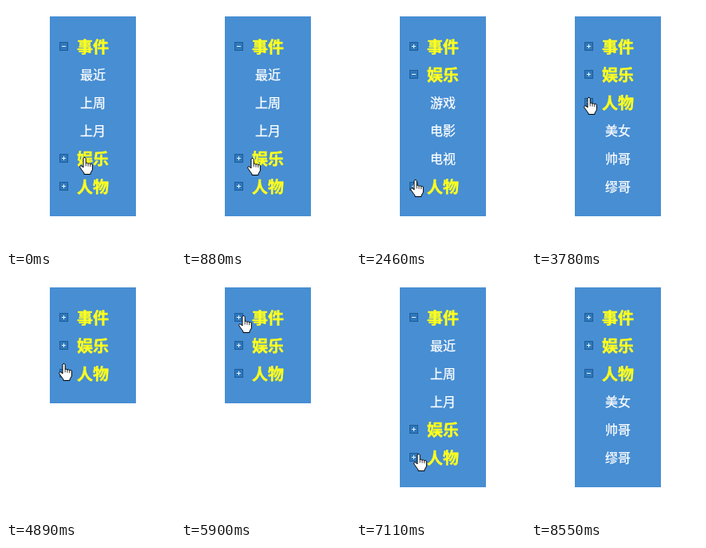
These frames come from a looping animation (212x304 px, 8.93 s). An HTML page:

```html
<!DOCTYPE html>
<html lang="zh-CN">
<head>
<meta charset="utf-8">
<title>菜单</title>
<style>
html, body { margin: 0; width: 100%; height: 100%; overflow: hidden; background: #fff; }
svg { display: block; font-family: "Noto Sans CJK SC", "Noto Sans CJK", sans-serif; }
.title { font-size: 20px; font-weight: 700; fill: #ffff1e; stroke: #ffff1e; stroke-width: .4px; }
.item { font-size: 16px; fill: #fff; stroke: #fff; stroke-width: .25px; }
</style>
</head>
<body>
<svg width="212" height="304" viewBox="0 0 212 304">
  <rect id="panel" x="55" y="13" width="108" fill="#478ed3"/>
  <g id="menu"></g>
  <g id="hand" stroke="#000" stroke-linejoin="round" stroke-linecap="round">
    <path fill="#fff" d="M6.6.5C5.4.5 5 1.3 5 2.1V13L3 11.2C1.6 10.2 0 11.4.8 12.9L4.4 18 6 20V21.5H14V20L16.4 16V10C16.4 8.3 14.3 7.9 13.8 9.2 13.5 7.6 11.4 7.3 11 8.5 10.6 7 8.6 6.8 8.2 7.8V2.1C8.2 1.3 7.8.5 6.6.5Z"/>
    <path fill="none" stroke-width=".8" d="M8.2 8V11M11 8.6V11.4M13.8 9.4V11.8"/>
  </g>
</svg>
<script>
const LOOP = 8930, STEP = 65, TOP = 33, ROW = 35;
const groups = [
  ['事件', '最近', '上周', '上月'],
  ['娱乐', '游戏', '电影', '电视'],
  ['人物', '美女', '帅哥', '缪哥']
];
const home = [92, 189];
// start, end, x, y, sideways bow
const moves = [
  [130, 210, 73, 198],
  [390, 1140, 69, 186, 14],
  [1890, 2280, 61, 217],
  [2430, 2460, 68, 217],
  [3130, 3780, 66, 114, 6],
  [4820, 5270, 68, 82],
  [5470, 5720, 72, 48],
  [6260, 7110, 72, 221, 7],
  [7180, 7300, 66, 226],
  [8180, 8550, 194, 304]
];
const clicks = [1510, 2820, 4210, 6080, 7750];

const byId = id => document.getElementById(id);
const panel = byId('panel'), menu = byId('menu'), hand = byId('hand');

const ease = p => .5 * p + .5 * p * p * (3 - 2 * p);
const mix = (a, b, p) => a + (b - a) * p;

// The pointer advances in even ticks, one roughly every STEP ms.
function handAt(t) {
  let [x, y] = home;
  for (const [t0, t1, x1, y1, bow = 0] of moves) {
    if (t < t0) break;
    const n = Math.round((t1 - t0) / STEP) + 1;
    const done = Math.min(1, (t - t0) / (t1 - t0));
    const p = ease((Math.floor(done * (n - 1) + 1e-6) + 1) / n);
    x = Math.round(mix(x, x1, p) + bow * Math.sin(Math.PI * p));
    y = Math.round(mix(y, y1, p));
  }
  return [x, y];
}

// Visible rows, top to bottom
const rowsFor = open => groups.flatMap(([title, ...items], group) => [
  { text: title, group },
  ...(group === open ? items.map(text => ({ text })) : [])
]);

// Each click toggles the group under the pointer.
function openAt(t) {
  let open = 0;
  for (const at of clicks.filter(c => c <= t)) {
    const { group } = rowsFor(open)[Math.floor((handAt(at)[1] - TOP) / ROW)];
    open = group === open ? -1 : group;
  }
  return open;
}

const label = (cls, x, y, s) => `<text class="${cls}" x="${x}" y="${y}">${s}</text>`;

function icon(y, open) {
  const plus = open ? '' : `<path d="M72.5 ${y + 3}v5"/>`;
  return `<rect x="67.5" y="${y + .5}" width="10" height="10" fill="#2f78bb" stroke="#1f5c96"/>
    <g stroke="#e8f4ff"><path d="M70 ${y + 5.5}h5"/>${plus}</g>`;
}

function drawMenu(open) {
  const rows = rowsFor(open);
  menu.innerHTML = rows.map(({ text, group }, i) => {
    const y = TOP + i * ROW;
    return group === undefined
      ? label('item', 93, y + 24, text)
      : icon(y + 12, group === open) + label('title', 89, y + 25.5, text);
  }).join('');
  panel.setAttribute('height', rows.length * ROW + 40);
}

let shown;
function render(t) {
  const open = openAt(t);
  if (open !== shown) drawMenu(shown = open);
  hand.setAttribute('transform', `translate(${handAt(t)})`);
}

const start = performance.now();
function tick(now) {
  render(Math.max(0, now - start) % LOOP);
  requestAnimationFrame(tick);
}
render(0);
requestAnimationFrame(tick);
</script>
</body>
</html>
```
